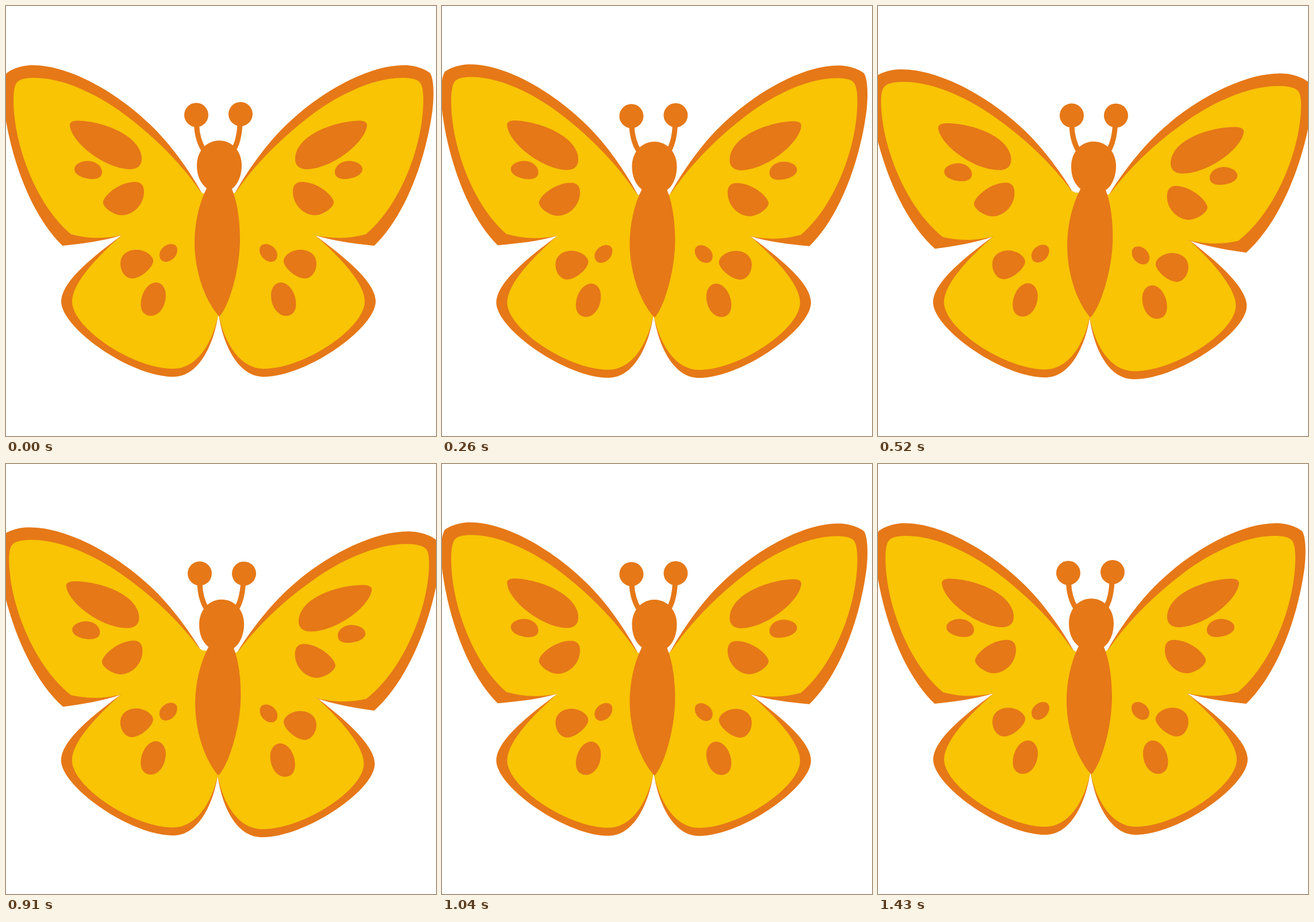
An HTML page for the animation above (1560 ms loop, 748 px wide and 748 px high).

```html
<!DOCTYPE html>
<html lang="en">
<head>
<meta charset="utf-8">
<title>Butterfly</title>
<style>
  html, body { margin: 0; width: 100%; height: 100%; overflow: hidden; background: #fff; }
  svg { display: block; width: 100%; height: 100%; }
  .edge { fill: #e67817; }
  .fill { fill: #f8c404; }
  .feeler { fill: none; stroke: #e67817; stroke-width: 9; }
</style>
</head>
<body>
<svg viewBox="0 0 748 748">
  <defs>
    <g id="upper">
      <path class="edge" d="M340,324 C325,297 303,265 283,241 C222,166 119,103 47,103 C25,103 8,111 1,117 C-5,127 -6,152 -3,180 C7,258 41,362 98.500,417 C135,413 168,409 201,399 Z"/>
      <path class="fill" d="M338.500,323 C306,276 262,231 212,193 C170,160 105,125 50,125 C35,125 24,127 19,133 C13,140 12,160 14,185 C20,258 57,350 113,397 C140,404 165,406 201,399 L262,408 L369,411 L369,330 L345,327 Z"/>
      <g class="edge">
        <path d="M111,206 C112,201 118,199 127,199.500 C170,201 236,226 236,266 C236,278 228,284 215,284 C168,282 111,234 111,206 Z"/>
        <path d="M119,284 C119,275 131,269.500 143,269.500 C157,270 167,279 167,289 C167,297 160,301 151,301 C135,301 119,294 119,284 Z"/>
        <path d="M169,340 C173,326 200,306 224,306 C235,306 240,312 240,323 C240,346 221,364 201,364 C188,364 167,350 169,340 Z"/>
      </g>
    </g>
    <g id="lower">
      <path class="edge" d="M201,399 C150,437 96,480 96,514 C96,560 216,645 291,645 C335,645 361,590 369,538 Z"/>
      <path class="fill" d="M201,399 C158,437 115,482 115,514 C115,560 220,631 291,631 C330,631 358,590 369,538 L371,400 L345,330 Z"/>
      <g class="edge">
        <path d="M256,442 C254,432 240,424 227,424 C210,424 199,434 199,448 C199,462 208,474 219,474 C235,474 258,453 256,442 Z"/>
        <path d="M298,424 C298,436 287,445 278,445 C271,445 267,440 267,433 C267,423 278,414 287,414 C294,414 298,418 298,424 Z"/>
        <path d="M261,481 C271,481 278,491 278,503 C278,523 266,539 252,539 C241,539 234.500,531 234.500,519 C234.500,499 247,481 261,481 Z"/>
      </g>
    </g>
  </defs>
  <g id="lowerLeft"><use href="#lower"/></g>
  <g id="lowerRight"><use href="#lower" transform="matrix(-1 0 0 1 739 0)"/></g>
  <g id="upperLeft"><use href="#upper"/></g>
  <g id="upperRight"><use href="#upper" transform="matrix(-1 0 0 1 739 0)"/></g>
  <g id="body">
    <path class="feeler" d="M331.500,205 C332,225 337,240 345,252 M407,205 C406,225 402,240 396,250"/>
    <circle class="edge" cx="331" cy="189.500" r="21"/>
    <circle class="edge" cx="408" cy="188" r="21"/>
    <path class="edge" d="M371,234 C393,234 410,252 410,277 C410,297 402,312 393,318 C404,345 407,380 407,405 C407,460 388,520 373,538 Q371,541 369,538 C345,510 328,460 328,411 C328,380 335,345 349,317 C338,308 332,295 332,277 C332,252 349,234 371,234 Z"/>
  </g>
</svg>
<script>
  const STEP = 130;
  const parts = ['lowerLeft', 'lowerRight', 'upperLeft', 'upperRight', 'body']
    .map(id => document.getElementById(id));

  // One transform per part, in the order above
  const rest = ['', '', '', '', ''];
  const raised = [
    'translate(-1.6 1.8)',
    'translate(-1.2 2)',
    'translate(-1.5 2) rotate(1 255 415)',
    'translate(-1.3 2) rotate(-0.46 500 425)',
    'translate(-1.5 2)'
  ];
  const tilted = [
    'translate(-0.2 1.2)',
    'rotate(1.35 270 450)',
    'rotate(-1.9 260 400)',
    'rotate(2.3 340 420)',
    'rotate(1.25 290 465)'
  ];
  const cycle = [rest, tilted, raised, raised, tilted, rest];

  let shown;
  function draw(ms) {
    const pose = cycle[Math.floor(ms / STEP) % cycle.length];
    if (pose === shown) return;
    shown = pose;
    parts.forEach((part, i) => part.setAttribute('transform', pose[i]));
  }

  const start = performance.now();
  function tick() {
    draw(performance.now() - start);
    requestAnimationFrame(tick);
  }
  tick();
</script>
</body>
</html>
```
